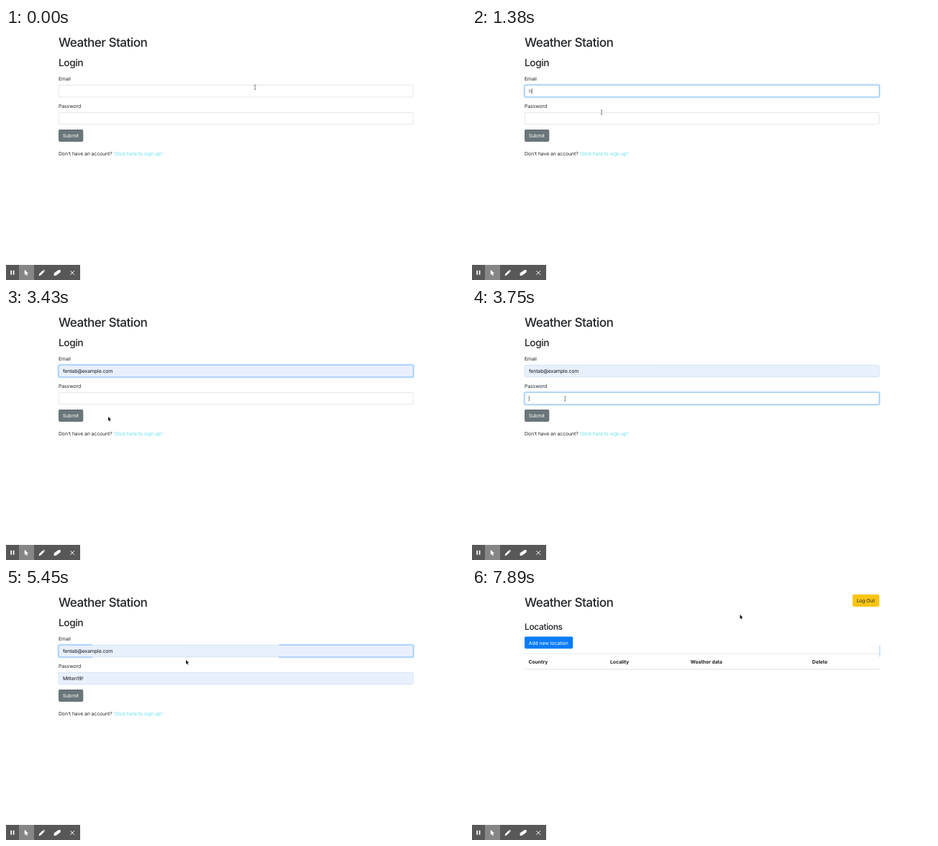
Animation of 639x350 px, one loop 8000 ms. Source, as an HTML page:

```html
<!DOCTYPE html>
<html lang="en">
<head>
<meta charset="utf-8">
<title>Weather Station</title>
<style>
  html, body { margin: 0; width: 100%; height: 100%; overflow: hidden; background: #fff; }
  svg { display: block; width: 639px; height: 350px; }
  text { font: 400 6.85px Inter, "Open Sans", sans-serif; letter-spacing: -.01em; fill: #212529; text-rendering: geometricPrecision; }
  .h1, .h2, .h3 { font-weight: 500; letter-spacing: -.03em; }
  .h1 { font-size: 17.1px; }
  .h2 { font-size: 13.7px; }
  .h3 { font-size: 12px; }
  .th { font-weight: 700; }
  .light { fill: #fff; }
  .link { fill: #62dfeb; }
  .field .box { fill: #fff; stroke: #ced4da; stroke-width: .6; }
  .field .value { fill: #495057; }
  .field .glow { fill: none; stroke: #bfdeff; stroke-width: 1.5; }
  .field .ring { fill: none; stroke: #80bdff; stroke-width: .6; }
  .field .caret { stroke: #222; stroke-width: .6; }
  .filled .box { fill: #e8f0fe; stroke: #c3d3ea; }
  .filled .value { fill: #111; }
  .settling .box { stroke: #8fb3dc; }
</style>
</head>
<body>
<svg viewBox="0 0 639 350">
  <defs>
    <clipPath id="split"><path d="M60 70H120V105H60ZM379 70H580V105H379Z"/></clipPath>
  </defs>
  <text class="h1" x="73" y="26.2">Weather Station</text>

  <g id="login">
    <text class="h2" x="73" y="52.8">Login</text>
    <text x="73" y="73">Email</text>
    <g id="email" class="field"></g>
    <text x="73" y="111">Password</text>
    <g id="password" class="field"></g>
    <rect x="73" y="141" width="34.3" height="16.9" rx="1.8" fill="#6a7679"/>
    <text class="light" x="78.8" y="152.3">Submit</text>
    <text x="73" y="176.5">Don't have an account?</text>
    <text class="link" x="150.2" y="176.5">Click here to sign up!</text>
  </g>

  <g id="locations">
    <rect x="528.6" y="9" width="37.2" height="16.9" rx="1.8" fill="#fac514"/>
    <text x="534.2" y="20">Log Out</text>
    <text class="h3" x="73" y="58.3">Locations</text>
    <rect x="73" y="67.4" width="67.2" height="16.9" rx="1.8" fill="#087cfa"/>
    <text class="light" x="78.8" y="78.6">Add new location</text>
    <path d="M73 91.3H566" stroke="#dee2e6" stroke-width=".7"/>
    <path d="M73 113H566" stroke="#dee2e6" stroke-width="1.1"/>
    <path d="M566.5 79.5V95.5" stroke="#a4cdfa" stroke-width=".9"/>
    <path d="M72.4 84V95" stroke="#eef5fd" stroke-width=".8"/>
    <text class="th" x="78.5" y="104.7">Country</text>
    <text class="th" x="192" y="104.7">Locality</text>
    <text class="th" x="303.6" y="104.7">Weather data</text>
    <text class="th" x="472.6" y="104.7">Delete</text>
  </g>

  <g id="toolbar">
    <path d="M0 329H103V350H0Z" fill="#585858"/>
    <path d="M18 329H39V350H18Z" fill="#868686"/>
    <path d="M7.2 336.8V342.8M10.6 336.8V342.8" stroke="#fff" stroke-width="1.7"/>
    <path d="M25.8 335.8V343L27.5 341.5L28.8 344.3L30 343.7L28.8 341L31 340.8Z" fill="#fff"/>
    <path d="M45.6 344.2L46.2 341.6L51 336.8L53 338.8L48.2 343.6ZM51.6 336.2L52.4 335.6L54.2 337.4L53.5 338.2Z" fill="#fff"/>
    <path d="M66.6 340.6L73 336H75.6V339.2L69.2 344H66.6Z" fill="#fff"/>
    <path d="M89.4 337.2L95 342.8M95 337.2L89.4 342.8" stroke="#fff" stroke-width="1"/>
  </g>

  <path id="beam" d="M-1.3 -3.2Q0 -3.2 0 -2.3Q0 -3.2 1.3 -3.2M0 -2.4V2.4M-1.3 3.2Q0 3.2 0 2.3Q0 3.2 1.3 3.2" fill="none" stroke="#555" stroke-width=".7"/>
  <path id="arrow" d="M0 0V5.6L1.3 4.4L2.2 6.5L3.2 6.1L2.3 4.1H4Z" fill="#111" stroke="#fff" stroke-width=".5" paint-order="stroke"/>
</svg>
<script>
const LOOP = 8000;
const $ = id => document.getElementById(id);
const show = (el, on) => { el.style.display = on ? '' : 'none'; };
const latest = (track, t) => track.findLast(step => step[0] <= t);

// time, pointer, x, y
const pointer = [
  [0, 'beam', 346, 82.3], [160, 'arrow', 318, 68], [320, 'beam', 270, 82],
  [480, 'beam', 220, 87], [640, 'beam', 198, 90], [800, 'beam', 180, 117],
  [2010, 'beam', 174, 123], [2260, 'arrow', 160, 148], [2390, 'arrow', 150.3, 162.8],
  [3430, 'arrow', 142, 151], [3580, 'beam', 131, 128], [3750, 'beam', 129.3, 126],
  [3880, 'arrow', 126, 150], [4330, 'arrow', 123, 157], [4480, 'arrow', 121, 162],
  [4630, 'arrow', 120.3, 164.3], [4950, 'arrow', 121, 158], [5100, 'arrow', 121, 150],
  [5280, 'arrow', 121, 144], [5450, 'arrow', 250, 100], [5590, 'arrow', 375.3, 55.8],
  [7060, 'arrow', 375, 52], [7190, 'arrow', 374, 47], [7320, 'arrow', 373, 43],
  [7480, 'arrow', 372.5, 39], [7890, 'arrow', 372.2, 37]
];

// time, value, flags
const emailSteps = [
  [0, '', ''], [640, '', 'focus'], [1080, '', 'focus caret'],
  [1380, 'h', 'focus caret'], [1510, 'helmto@example.com', 'focus filled'],
  [2010, 'helmto@example.com', 'focus filled caret'], [2780, 'f', 'focus'],
  [3080, 'fentab@example.com', 'focus filled'], [3580, 'fentab@example.com', 'filled'],
  [3880, 'fentab@example.com', 'focus filled caret'], [5450, 'fentab@example.com', 'focus filled split']
];
const passwordSteps = [
  [0, '', ''], [3580, '', 'focus caret'], [3880, '', ''],
  [4330, 'Mitten19!', 'filled settling'], [4950, 'Mitten19!', 'filled']
];

function makeField(id, top) {
  const root = $(id);
  const rect = (name, grow) => `<rect class="${name}" x="${73.2 - grow}" y="${top - grow}"
    width="${492.4 + 2 * grow}" height="${16.4 + 2 * grow}" rx="${1.8 + grow}"/>`;
  root.innerHTML = rect('box', 0) +
    `<g class="focus">${rect('glow', .9)}${rect('ring', 0)}</g>
     <text class="value" x="79" y="${top + 10.7}"></text>
     <path class="caret"/>`;
  const [focus, value, caret] = ['.focus', '.value', '.caret'].map(s => root.querySelector(s));
  let current;
  return step => {
    if (step === current) return;
    current = step;
    const [, text, flags] = step;
    const has = flag => flags.split(' ').includes(flag);
    value.textContent = text;
    root.setAttribute('class', 'field ' + flags.replace('focus', ''));
    show(focus, has('focus'));
    focus.setAttribute('clip-path', has('split') ? 'url(#split)' : 'none');
    show(caret, has('caret'));
    const end = 79.3 + (text ? value.getComputedTextLength() : 0);
    caret.setAttribute('d', `M${end} ${top + 4.4}v7.8`);
  };
}

const drawEmail = makeField('email', 79.3);
const drawPassword = makeField('password', 117.4);
const start = performance.now();

function draw() {
  const t = (performance.now() - start) % LOOP;
  const signedIn = t >= 7320;
  show($('login'), !signedIn);
  show($('locations'), signedIn);
  drawEmail(latest(emailSteps, t));
  drawPassword(latest(passwordSteps, t));
  const [, kind, x, y] = latest(pointer, t);
  for (const id of ['beam', 'arrow']) {
    show($(id), id === kind);
    $(id).setAttribute('transform', `translate(${x} ${y})`);
  }
  requestAnimationFrame(draw);
}
draw();
</script>
</body>
</html>
```
